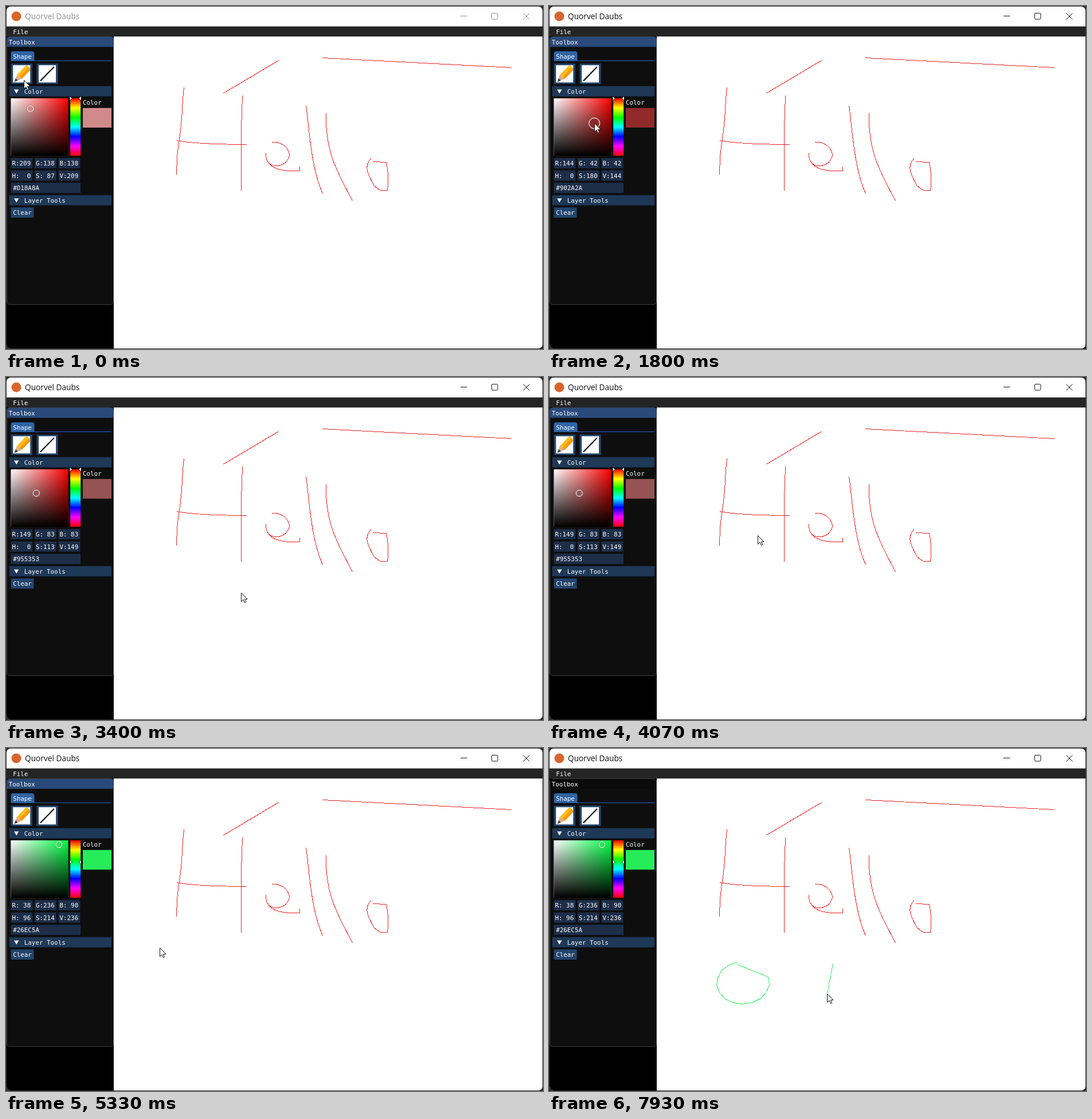
Recreate the animation shown at these times as an HTML page. Size 937 by 598 pixels, loop 8000 ms.

```html
<!DOCTYPE html>
<html lang="en">
<head>
<meta charset="utf-8">
<title>Quorvel Daubs</title>
<style>
  html, body { margin: 0; width: 100%; height: 100%; overflow: hidden; background: #2b2b2b; }
  svg { display: block; width: 937px; height: 598px; }
  .mono text { font: 10.87px "DejaVu Sans Mono", "Liberation Mono", monospace; fill: #fff; white-space: pre; }
  .title { font: 13.7px "Open Sans", "Noto Sans", sans-serif; }
  .btn { fill: #23446c; }
  .head { fill: #1e3857; }
  .field { fill: #1d2e49; }
  .ink { fill: none; stroke: #ee2222; stroke-width: 1; shape-rendering: crispEdges; }
  .green { stroke: #26ec5a; }
  #chrome { color: #111; }
  #chrome.idle { color: #8f8f8f; }
</style>
</head>
<body>
<svg viewBox="0 0 937 598">
  <defs>
    <clipPath id="win"><rect x="1" y="1" width="935" height="596" rx="7"/></clipPath>
    <linearGradient id="sat"><stop stop-color="#fff"/><stop offset="1" stop-color="#fff" stop-opacity="0"/></linearGradient>
    <linearGradient id="val" x2="0" y2="1"><stop stop-opacity="0"/><stop offset="1"/></linearGradient>
    <linearGradient id="hues" x2="0" y2="1">
      <stop stop-color="#f00"/><stop offset=".1667" stop-color="#ff0"/><stop offset=".3333" stop-color="#0f0"/>
      <stop offset=".5" stop-color="#0ff"/><stop offset=".6667" stop-color="#00f"/>
      <stop offset=".8333" stop-color="#f0f"/><stop offset="1" stop-color="#f00"/>
    </linearGradient>
  </defs>

  <g clip-path="url(#win)">
    <rect width="937" height="598" fill="#fff"/>
    <rect y="35.6" width="937" height="17.6" fill="#242424"/>
    <rect y="53" width="188" height="545" fill="#000"/>

    <g id="chrome">
      <circle cx="18" cy="18" r="8.5" fill="#d9652c"/>
      <text class="title" x="33" y="23" fill="currentColor">Quorvel Daubs</text>
      <g fill="none" stroke="currentColor">
        <path d="M793 17.5h11.5M902.5 12.5l11 11m0-11l-11 11"/>
        <rect x="847.5" y="12.5" width="10.5" height="10.5" rx="1.5"/>
      </g>
    </g>

    <g class="mono">
      <text x="12.2" y="48.5">File</text>

      <rect x="1.5" y="53.5" width="186" height="467" rx="5" fill="#0e0e0e" stroke="#3f3f46"/>
      <rect id="bar" x="2" y="54" width="185" height="17.2"/>
      <text x="4.8" y="66.5">Toolbox</text>

      <path d="M8.500 95.5V83q0-4 4-4h33q4 0 4 4v12.5zM8.500 95h175.500v1H8.500z" fill="#2f64a6"/>
      <text x="12.2" y="92">Shape</text>

      <rect id="pencil" class="btn" x="8.5" y="100.4" width="37.4" height="35.5"/>
      <rect class="btn" x="53.4" y="100.4" width="37.4" height="35.5"/>
      <path d="M12.2 103.2h30v30h-30zM57.1 103.2h30v30h-30z" fill="#fff"/>
      <path d="M19 120L34 104.5q2-1.5 4 0l3.5 4q1 2 0 3.500L27.5 127z" fill="#fdbb1c"/>
      <path d="M23.5 124L39.5 107l2 2q1 2 0 3.500L27.5 127z" fill="#f6990f"/>
      <path d="M19 120l8.5 7L15 132z" fill="#d8b08a"/>
      <path d="M16.8 126l4 3.800L14.5 132.500z" fill="#444"/>
      <path d="M60 130.5L84 106" stroke="#000" stroke-width="2"/>

      <rect class="head" x="5.6" y="139.7" width="178.4" height="17.8"/>
      <path d="M14 145.5h8.5l-4.250 7z" fill="#fff"/>
      <text x="31.8" y="152.6">Color</text>

      <rect id="hue" x="8.5" y="161" width="100" height="100"/>
      <rect x="8.5" y="161" width="100" height="100" fill="url(#sat)"/>
      <rect x="8.5" y="161" width="100" height="100" fill="url(#val)"/>
      <rect x="112.2" y="161" width="18" height="100" fill="url(#hues)"/>
      <g id="marks">
        <path d="M110.500-4.500l5.500 4.500l-5.500 4.500zM132-4.500l-5.500 4.500l5.500 4.500z" fill="#000"/>
        <path d="M111.500-3.200l3.500 3.200l-3.500 3.200zM131-3.200l-3.500 3.200l3.500 3.200z" fill="#fff"/>
      </g>
      <g id="ring">
        <circle id="halo" fill="none" stroke="#808080"/>
        <circle id="dot" stroke="#fff"/>
      </g>
      <text x="134" y="171.5">Color</text>
      <rect id="swatch" x="134" y="177.8" width="50" height="34.2"/>
      <g id="fields"></g>

      <rect class="head" x="5.6" y="329.7" width="178.4" height="17.8"/>
      <path d="M14 335.5h8.5l-4.250 7z" fill="#fff"/>
      <text x="31.8" y="342.6">Layer Tools</text>
      <rect class="btn" x="8.5" y="351.2" width="40" height="17.8"/>
      <text x="12.2" y="364.1">Clear</text>
    </g>

    <path class="ink" d="M379.5 152L475.5 95M552.5 90.5L882.5 107.5
      M310.5 142.5C306 180 309 190 302.5 232S299 270 297.5 294
      M412.5 156.5L410.5 214V322M298.5 234.5Q330 241 420.5 241.5
      M464 237.5C480 236 493 246 494.5 260C492 276 476 280 467 278.5C458 276 453 268 453.5 256
      M453.5 262C457 284 480 289 512.5 287.5V280
      M523.5 174C528 200 531 280 552.5 327M558.5 187C557 250 573 280 604.5 339.5
      M636.5 266C626 278 628 288 642 313Q650 320 654 321.5H665.5Q669 300 663.5 272.5L640.5 271.5"/>
    <polyline id="loop" class="ink green"/>
    <polyline id="tail" class="ink green"/>
  </g>

  <path id="cursor" d="M.5 .5V15.5L4 12.2L6.5 17.5L8.8 16.5L6.4 11.3H11z" fill="#fff" stroke="#111"/>
</svg>

<script>
const LOOP = 8000, RATE = 15;
const FOCUS = 14, DRAW = 87, TURN = 100, LIFT = 105, TAIL = 113;
const LEFT = 8.5, TOP = 161, SIZE = 100, ROW = 21.5;
const $ = id => document.getElementById(id);

// Picker positions for saturation and value in 0..255
const spot = (s, v) => [LEFT + s / 2.55, TOP + SIZE - v / 2.55];
const PINK = spot(87, 209), WINE = spot(180, 144), ROSE = spot(113, 149), LIME = spot(214, 236);
const GREEN_HUE = TOP + 37.68;

// Pointer moves: first tick, last tick, where it ends; it rests in between
const moves = [
  [0, 3, [24, 122]], [6, 7, [20, 120]], [15, 16, [45, 128]], [18, 21, [98, 236]],
  [21, 25, [84, 209]], [25, 27, WINE], [27, 36, [36, 200]], [36, 44, [54, 206]], [47, 48, ROSE],
  [48, 51, [410, 376]], [51, 60, [425, 303]],
  [60, 65, [121, 172]], [65, 67, [120, GREEN_HUE]], [67, 72, [80, 185]], [72, 76, LIME],
  [77, 80, [268, 348]], [80, DRAW, [328, 373]],
  [TURN, LIFT, [328, 377]], [LIFT, TAIL, [495, 376]], [TAIL, 119, [485, 428]]
];

// Hand-drawn circle, counterclockwise from the top
function orbit(k) {
  const a = -(102 + 274 * k) * Math.PI / 180;
  return [338 + 46 * Math.cos(a), 409 + 37 * Math.sin(a)];
}

function pointer(tick) {
  if (tick >= DRAW && tick <= TURN) return orbit((tick - DRAW) / (TURN - DRAW));
  let at = tick > TURN ? orbit(1) : [31, 129];
  for (const [from, to, end] of moves) {
    if (tick > TURN && from < TURN) continue;
    if (tick <= from) break;
    const k = Math.min(1, (tick - from) / (to - from));
    at = at.map((n, i) => n + (end[i] - n) * k);
  }
  return at;
}

function picked(tick) {
  if (tick < 25) return PINK;
  return pointer(tick < 72 ? Math.min(tick, 48) : Math.min(tick, 77));
}

const hueAt = tick => tick < 65 ? 0 : (pointer(Math.min(tick, 67))[1] - TOP) / SIZE;

function toRgb(h, s, v) {
  return [5, 3, 1].map(n => {
    const k = (n + h * 6) % 6;
    return Math.round(255 * v * (1 - s * Math.max(0, Math.min(k, 4 - k, 1))));
  });
}

function add(tag, attrs) {
  const el = document.createElementNS('http://www.w3.org/2000/svg', tag);
  for (const name in attrs) el.setAttribute(name, attrs[name]);
  return $('fields').appendChild(el);
}

function field(x, row, width, pad) {
  const y = 265.2 + row * ROW;
  add('rect', { class: 'field', x, y, width, height: 17.8 });
  return add('text', { x: x + pad, y: y + 12.9 });
}

const labels = [0, 1, 2, 3, 4, 5].map(i => field(LEFT + i % 3 * 41.5, Math.floor(i / 3), 37.8, 2));
const hex = field(LEFT, 2, 121.5, 3.7);

const css = rgb => `rgb(${rgb})`;
const place = (id, x, y) => $(id).setAttribute('transform', `translate(${x} ${y})`);

function stroke(id, from, to) {
  const points = [];
  for (let i = from; i <= to; i++) points.push(pointer(i).map(n => Math.round(n) + .5));
  $(id).setAttribute('points', points.join(' '));
}

function showColor(tick) {
  const [x, y] = picked(tick), [px, py] = picked(tick - 1);
  const h = hueAt(tick), s = (x - LEFT) / SIZE, v = 1 - (y - TOP) / SIZE;
  const rgb = toRgb(h, s, v);
  const r = x !== px || y !== py ? 9.2 : 5.4;

  $('hue').style.fill = css(toRgb(h, 1, 1));
  $('swatch').style.fill = $('dot').style.fill = css(rgb);
  $('dot').setAttribute('r', r);
  $('halo').setAttribute('r', r + .8);
  place('ring', x, y);
  place('marks', 0, TOP + h * SIZE);

  const values = [...rgb, ...[h, s, v].map(n => Math.round(n * 255))];
  values.forEach((n, i) => labels[i].textContent = 'RGBHSV'[i] + ':' + String(n).padStart(3));
  hex.textContent = '#' + rgb.map(n => n.toString(16).padStart(2, '0')).join('').toUpperCase();
}

function render(tick) {
  $('chrome').setAttribute('class', tick < FOCUS ? 'idle' : '');
  $('bar').style.fill = tick < DRAW ? '#294a7a' : '#0a0a0a';
  $('pencil').style.fill = tick < FOCUS || tick > 18 ? '' : tick < 16 ? '#0f87fa' : '#4296fa';
  showColor(tick);
  stroke('loop', DRAW, Math.min(tick, LIFT));
  stroke('tail', TAIL, tick);
  place('cursor', ...pointer(tick).map(Math.floor));
}

const start = performance.now();
let shown = -1;
function frame() {
  const t = (performance.now() - start) % LOOP;
  const tick = Math.min(119, Math.floor((t + 3.4) * RATE / 1000));
  if (tick !== shown) render(shown = tick);
  requestAnimationFrame(frame);
}
frame();
</script>
</body>
</html>
```
